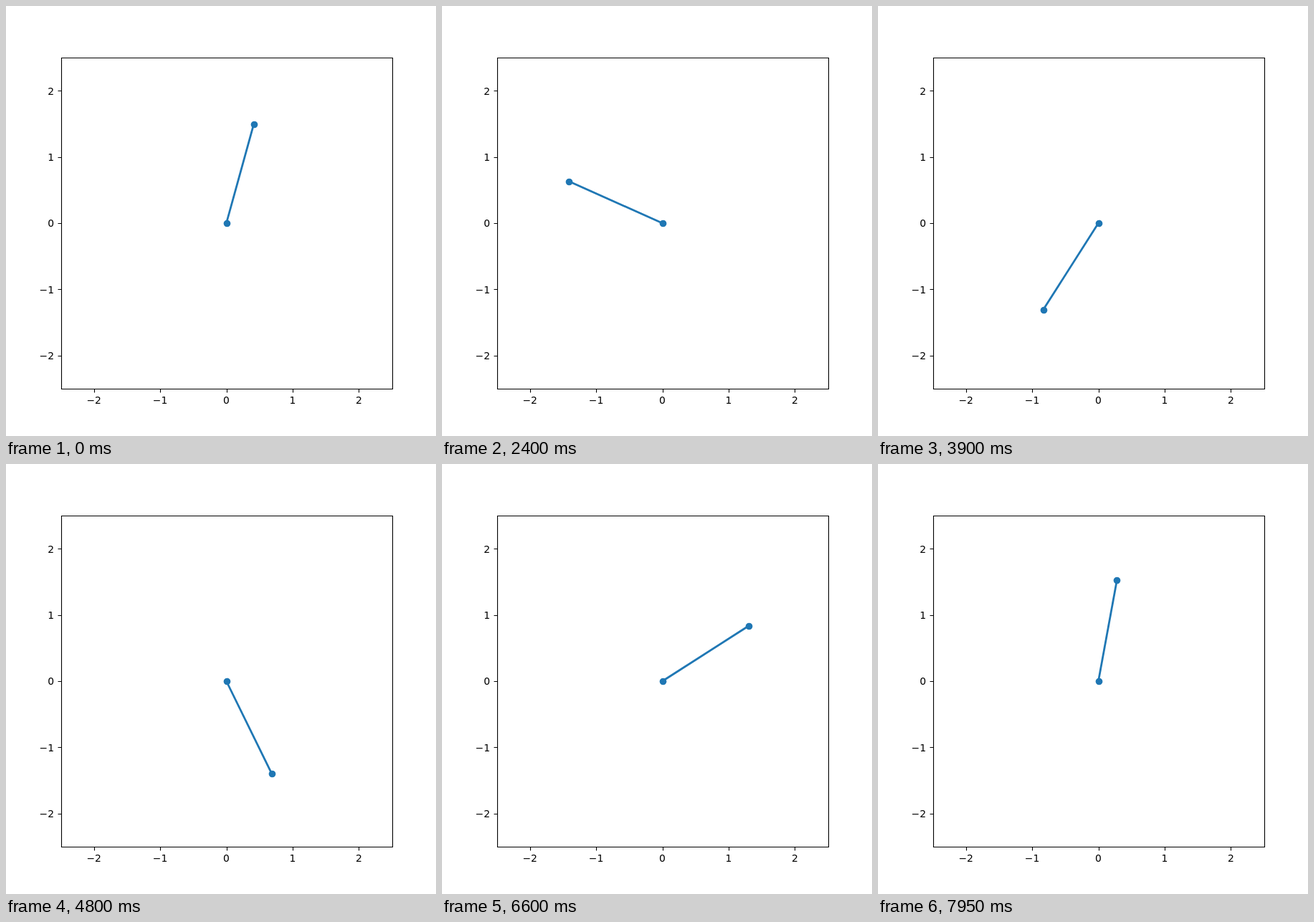
Recreate the animation shown at these times as an HTML page. Size 600 by 600 pixels, loop 8 s.

```html
<!DOCTYPE html>
<html lang="en">
<head>
<meta charset="utf-8">
<title>Swinging rod</title>
<style>
  html, body { margin: 0; height: 100%; overflow: hidden; background: #fff; }
  svg { display: block; width: 600px; height: 600px; }
  text { font: 13.89px "DejaVu Sans", sans-serif; }
  #axes { fill: none; stroke: #000; stroke-width: 1.11; }
  #rod { stroke: #1f77b4; stroke-width: 2.78; }
  circle { fill: #1f77b4; }
</style>
</head>
<body>
<svg viewBox="0 0 600 600">
  <line id="rod" x1="307.5" y1="303"/>
  <circle cx="308.5" cy="303.5" r="4.86"/>
  <circle id="tip" r="4.86"/>
  <path id="axes"/>
  <g id="labels"></g>
</svg>
<script>
const FRAME_MS = 50, FRAMES = 160;
const CX = 307.5, CY = 303, UNIT = 92.4, LENGTH = 1.55 * UNIT;
const byId = id => document.getElementById(id);

function drawAxes() {
  let path = 'M77.5 72.5H539.5V534.5H77.5Z';
  let labels = '';
  for (let v = -2; v <= 2; v++) {
    const x = CX + v * UNIT, y = CY - v * UNIT;
    const name = String(v).replace('-', '\u2212');
    path += `M${Math.round(x) + .5} 534.5v5M77.5 ${Math.round(y) + .5}h-5`;
    labels += `<text x="${x}" y="555" text-anchor="middle">${name}</text>` +
      `<text x="67" y="${Math.ceil(y) + 5}" text-anchor="end">${name}</text>`;
  }
  byId('axes').setAttribute('d', path);
  byId('labels').innerHTML = labels;
}

// Pendulum going over the top; angle in radians, clockwise from upright.
function swing() {
  const gravity = 0.2596, substeps = 20, dt = FRAME_MS / 1000 / substeps;
  let angle = 15.47 * Math.PI / 180, speed = -0.5445;
  return Array.from({ length: FRAMES }, () => {
    const pose = angle;
    for (let i = 0; i < substeps; i++) {
      speed += gravity * Math.sin(angle) * dt / 2;
      angle += speed * dt;
      speed += gravity * Math.sin(angle) * dt / 2;
    }
    return pose;
  });
}

const angles = swing();
const rod = byId('rod'), tip = byId('tip');

function render(time) {
  const angle = angles[Math.floor(time / FRAME_MS) % FRAMES];
  const x = CX + LENGTH * Math.sin(angle), y = CY - LENGTH * Math.cos(angle);
  rod.setAttribute('x2', x);
  rod.setAttribute('y2', y);
  // Markers sit on whole pixels.
  tip.setAttribute('cx', Math.round(x) + .5);
  tip.setAttribute('cy', Math.round(y) + .5);
}

drawAxes();
render(0);
let start;
requestAnimationFrame(function tick(now) {
  start ??= now;
  render(now - start);
  requestAnimationFrame(tick);
});
</script>
</body>
</html>
```
